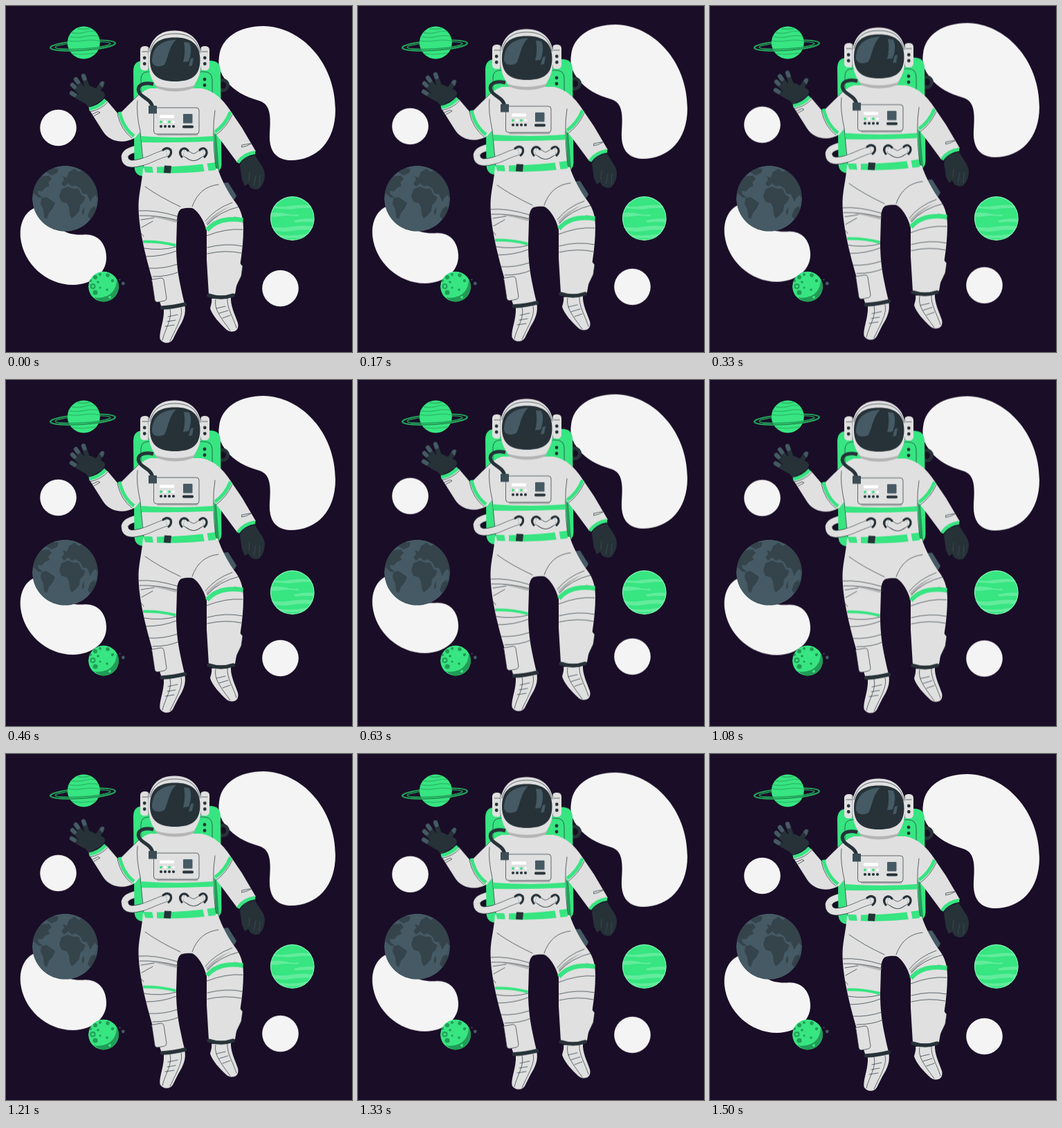
An HTML page that plays this animation: 500x500 px, repeating every 1540 ms.

```html
<!DOCTYPE html>
<html lang="en">
<head>
<meta charset="utf-8">
<title>Floating astronaut</title>
<style>
  html, body { margin: 0; height: 100%; overflow: hidden; background: #1a0d27; }
  svg { display: block; width: 100%; height: 100%; }

  /* 24 poses per second: up for 18, down for 18, then one rest */
  .float { animation: float 1540ms -5ms infinite steps(18); }
  @keyframes float {
    0%, 97.403%, 100% { transform: translateY(0); }
    48.701% { transform: translateY(-10px); }
  }

  .pale { fill: #f4f4f4; }
  .suit { fill: #e0e0e0; }
  .shade { fill: #b4b4b4; }
  .green { fill: #37e581; }
  .deep { fill: #229c57; }
  .mint { fill: #62ec9c; }
  .dark { fill: #263238; }
  .slate { fill: #455a64; }
  .land { fill: #35434b; }
  .line { fill: none; stroke: #263238; stroke-width: .7; stroke-linecap: round; stroke-linejoin: round; }
  .edge { stroke: #263238; stroke-width: .7; stroke-linejoin: round; }
  .band { fill: none; stroke: #37e581; stroke-width: 5; }
  .cuff { fill: none; stroke: #263238; stroke-width: 5.5; stroke-linecap: round; }
  .tube { fill: none; stroke: #e0e0e0; stroke-width: 9.5; }
  .rim { fill: none; stroke: #263238; stroke-width: 10.8; }
  .port { fill: none; stroke: #263238; stroke-width: 3.2; stroke-linecap: round; }
  .ring { fill: none; stroke: #229c57; }
  .finger { fill: none; stroke: #263238; stroke-width: 7; stroke-linecap: round; }
  .tip { fill: none; stroke: #455a64; stroke-width: 6; stroke-linecap: round; }
</style>
</head>
<body>
<svg viewBox="0 0 500 500" xmlns="http://www.w3.org/2000/svg">
  <defs>
    <clipPath id="saturn"><circle cx="112.3" cy="53" r="23.5"/></clipPath>
    <clipPath id="earth"><circle cx="85.5" cy="278.3" r="47.5"/></clipPath>
    <clipPath id="mint"><circle cx="413.8" cy="307" r="32"/></clipPath>
    <clipPath id="moon"><circle cx="141" cy="405.5" r="22"/></clipPath>
    <clipPath id="front"><path d="M55 57.5L165 52V80H55Z"/></clipPath>
    <g id="rings" class="ring" transform="rotate(-4 111 57)">
      <ellipse cx="111" cy="57" rx="47" ry="7" stroke-width="2.2"/>
      <ellipse cx="111" cy="57" rx="40" ry="4.6" stroke-width="1.3"/>
    </g>
    <path id="inlet" d="M198 205C181 207 171 211 171.500 219"/>
    <path id="outlet" d="M171.500 218C172 230 184 229 195 226C210 222 219 215 232 212.500"/>
    <path id="link" d="M257 212C263 213 264 218 271 218.500C278 218 279 213 285 212"/>
  </defs>

  <g class="float pale">
    <path d="M308 73C311 45 338 29 372 29C427 30 476 82 476 150C476 196 449 223 411 223C388 222 380 207 381 185C383 158 382 142 366 137C345 131 329 122 319 109C309 97 306 86 308 73Z"/>
    <path d="M46 290C28 295 19 313 21 335C25 372 58 403 97 403C126 402 146 385 145 362C144 340 130 329 112 330.500C95 331 82 328 74 316C65 300 58 288 46 290Z"/>
    <circle cx="75.500" cy="176" r="26.300"/>
    <circle cx="396.500" cy="408" r="26.300"/>
  </g>

  <!-- ringed planet -->
  <g>
    <use href="#rings"/>
    <circle class="green" cx="112.300" cy="53" r="23.500"/>
    <g clip-path="url(#saturn)" fill="none" stroke="#2cc16c" stroke-width="1.500">
      <path d="M92 38Q104 41 113 38T135 38M88 44Q102 47 114 44T138 45M88 50Q100 52 112 50T138 51M92 68Q108 72 134 67"/>
      <path d="M103 32Q110 35 122 32" stroke-width="2"/>
    </g>
    <g clip-path="url(#front)"><use href="#rings"/></g>
  </g>

  <!-- earth -->
  <g clip-path="url(#earth)">
    <circle class="slate" cx="85.500" cy="278.300" r="47.500"/>
    <g class="land">
      <path d="M38 268L42 256L52 246L62 245L66 250L61 255L63 260L56 263L52 268L46 267L47 272L53 277L47 277L39 270Z"/>
      <path d="M58 240L66 234L76 235L74 241L66 245Z"/>
      <path d="M51 278L58 276L66 281L71 285L67 293L62 299L59 308L55 305L54 294L50 286Z"/>
      <path d="M80 265L89 261L97 264L105 264L109 273L115 276L112 283L107 288L106 296L100 303L95 307L92 301L91 291L88 285L80 283L77 275Z"/>
      <path d="M80 257L84 251L82 246L88 248L91 240L99 235L105 240L112 236L126 248L135 262V280L129 273L125 277L122 283L117 272L111 271L107 263L100 259L95 261L90 256L84 261Z"/>
      <path d="M110 296L113 291L113 299L110 303ZM122 293L128 289L131 297L122 308L118 304Z"/>
    </g>
    <path d="M110 232C138 252 140 296 106 325L136 316V236Z" fill="#263238" opacity=".2"/>
  </g>

  <!-- banded planet -->
  <g clip-path="url(#mint)">
    <circle class="green" cx="413.800" cy="307" r="32"/>
    <g class="mint">
      <path d="M382 288Q394 292 410 289T446 289V292Q430 291 418 293T382 291Z"/>
      <path d="M380 300Q394 297 404 300T424 301L421 304Q407 302 396 304T380 303Z"/>
      <path d="M416 310Q430 306 447 308V312Q432 311 418 313Z"/>
      <path d="M380 318Q396 322 412 319T447 319V324Q426 322 412 325T380 322Z"/>
      <path d="M390 330Q412 334 436 329L430 334Q412 337 396 334Z"/>
    </g>
    <circle cx="413.800" cy="307" r="31.300" fill="none" stroke="#7af0ac" stroke-width="1.400"/>
  </g>

  <!-- cratered moon -->
  <g clip-path="url(#moon)">
    <circle class="green" cx="141" cy="405.500" r="22"/>
    <g class="deep">
      <path d="M160 394Q160 412 146 419Q136 423 127 421L140 430L166 426V394Z"/>
      <circle cx="129" cy="392" r="3"/><circle cx="125.500" cy="405" r="4"/>
      <circle cx="136" cy="388" r="2"/><circle cx="147" cy="389" r="2.800"/>
      <circle cx="154" cy="397" r="2.200"/><circle cx="133" cy="399" r="1.800"/>
      <circle cx="129" cy="414" r="3.500"/><circle cx="146" cy="410" r="1.800"/>
      <circle cx="122" cy="397" r="2"/><circle cx="136" cy="407" r="1.500"/>
    </g>
    <g class="green"><circle cx="125.500" cy="405" r="2"/><circle cx="150" cy="421" r="2"/></g>
  </g>
  <g class="slate"><circle cx="169.300" cy="401" r="2.400"/><circle cx="164.500" cy="395.500" r="1"/></g>

  <g class="float">
    <!-- backpack -->
    <use href="#inlet" class="rim"/>
    <use href="#inlet" class="tube"/>
    <circle cx="313" cy="114.500" r="7.500" fill="none" stroke="#263238" stroke-width="5"/>
    <path class="green" d="M184 94Q184 79 199 79H295Q310 79 310 94L311.500 229Q311 240 300 242L198 246Q186 245 185.500 232Z"/>
    <path class="line" d="M195 150V106Q195 95 206 95H286Q298 95 298 107V126"/>
    <g class="dark"><circle cx="287" cy="106" r="2.400"/><circle cx="287" cy="114.500" r="2.400"/></g>
    <path class="deep" d="M301 184L304 186L308 238L303 238Z"/>
    <path class="slate" d="M309 256L321 255L333 274Q331 281 322 284L312 270Z"/>

    <!-- calf box and feet -->
    <path class="suit edge" d="M332 364L342 376L340 390L331 409Z"/>
    <path class="suit" d="M228 438L258 431C261 444 256 455 249 466L241 482C237 489 226 488 222.500 481C221 470 229 455 228 438Z"/>
    <path class="line" d="M237 438C241 452 230 466 226 483M253 436C256 448 248 461 237 484M234 449L248 446M233 456L245 454M230 463L243 461"/>
    <path class="suit" d="M297 423L325 420C324 433 331 446 335 458C338 469 328 474 319 468C309 459 298 447 295 437C296 432 298 428 297 423Z"/>
    <path class="line" d="M303 424C300 438 311 451 324 469M320 423C319 436 328 449 333 465M304 437L317 434M308 444L321 440M313 451L324 447"/>

    <!-- legs -->
    <path class="suit" d="M198 234C197 252 192 270 191.500 287C191 322 203 366 212 397L225 436Q242 439 258 430C251 400 246 379 246 346L247 312C247 303 249 295 254 293Q262 291 269 292C276 295 286 308 290 325L290 367L293 417Q312 423 331 416C336 386 343 356 343 321C343 303 338 292 331 283C322 271 312 253 306 235Z"/>
    <path class="shade" d="M208 304Q230 305 248 310L246 313Q228 308 208 304ZM289 313Q304 296 326 289Q309 296 291 317Z"/>
    <path class="line" d="M192 296Q215 294 248 304L249 310Q220 302 193 303M201 261Q222 276 252 290M307 258Q279 261 269 290M288 311Q302 293 327 284M291 316Q308 297 337 290M195 309L214 306M196 320L212 311M193 326L199 333M199 350Q224 354 246 348M202 362Q226 362 246 354M207 379Q228 380 248 373M212 391Q235 391 250 384M290 332Q318 321 342 323M291 349Q318 342 342 347M291 358Q317 352 340 357M330 305L340 307"/>
    <path class="band" style="stroke-width:4" d="M198 340.500Q224 340 245.500 346"/>
    <path class="band" style="stroke-width:6.500" d="M290.500 324Q307 304 342.500 309.500"/>
    <path class="suit edge" d="M211 398Q209 395 213 395L224 393Q227 393 228 396L232 422Q232 425 229 426L219 428Q216 428 215 425Z"/>
    <path class="cuff" d="M225.500 436Q243 435 258.500 431"/>
    <path class="cuff" d="M293 418Q311 424 328 418"/>

    <!-- waving arm -->
    <path class="finger" d="M121 128L112 101M118 130L101 106M115 132L96 114M114 137L95 126M125 133L139 112"/>
    <path class="dark" d="M106 121Q113 112 123 116L134 121Q144 124 143 130L139 136L120 147Q113 139 106 130Z"/>
    <path class="tip" d="M113.500 105L112 101M104 110L101 106M99 117L96 114M99 128.500L95 126"/>
    <path class="slate" d="M135 113Q138 107 142 110L140 118Z"/>
    <path class="suit" d="M207 120C195 124 187 132 181 139L163 157L146 137L121 151L140 181C150 197 171 200 187 190L200 174L222 128Z"/>
    <path class="band" d="M120 149Q135 146 144 135.500"/>
    <path class="line" d="M121 153Q137 150 147 139M123 157L133 152.500L136 154L127 159M163 157L169 163M181 139L192 128"/>
    <path class="band" d="M164 153Q169 176 185 188"/>
    <path class="line" d="M161 156Q166 179 182 191"/>

    <!-- resting arm -->
    <path class="dark" d="M338 231Q339 223 347 219L360 216L367 227Q374 236 374 244Q374 256 366 264Q359 267 353 262L350 257L345 260L341 251Z"/>
    <path d="M351 253L352 240M358 260L361 245M366 260L367 245" fill="none" stroke="#455a64" stroke-width=".6"/>
    <path class="suit" d="M280 119C299 121 313 134 324 151L341 176L361 210L334 226L314 199L300 181Z"/>
    <path class="band" d="M335 226.500Q343 214 360 211.500"/>
    <path class="line" d="M338 231Q346 218 361 215M341 204Q348 203 354 199L351 199L341 201Z"/>

    <!-- torso -->
    <path class="suit" d="M208 119L282 119Q298 122 305 132L301 160Q299 190 303 236Q250 244 199 237L195 190Q190 164 191 135Q195 123 208 119Z"/>
    <path class="line" d="M190 137Q188 155 194 181L199 233M302 151Q297 181 303 233"/>
    <path class="band" d="M324.500 153Q317 172 302 182"/>
    <path class="line" d="M327 157Q319 175 304 186"/>
    <path class="green" d="M195 188Q248 192 299 188V195.500Q248 198 196 197Z"/>
    <path class="shade" d="M217 183H278L277 187.500H219Z"/>
    <rect class="suit edge" x="213.500" y="147" width="65.500" height="38" rx="4"/>
    <rect x="222" y="157.500" width="21" height="4.500" rx="1" fill="#fff"/>
    <g class="green"><circle cx="224" cy="167.500" r="1.900"/><circle cx="236" cy="167.500" r="1.900"/></g>
    <g fill="#fff"><circle cx="230" cy="167.500" r="1.900"/><circle cx="242" cy="167.500" r="1.900"/></g>
    <g class="dark">
      <circle cx="224" cy="174" r="2.100"/><circle cx="230" cy="174" r="2.100"/><circle cx="236" cy="174" r="2.100"/><circle cx="242" cy="174" r="2.100"/>
      <rect x="255" y="172.500" width="16" height="4" rx="1.800"/>
    </g>
    <rect class="slate" x="256" y="156" width="13.500" height="13.500" rx="1"/>

    <!-- belt -->
    <path class="green" d="M199 232Q252 234 302 226L303 237Q252 244 201 240.500Z"/>
    <path class="suit" d="M211 230H218V242H213ZM284 226L290 225L293 240L287 240Z"/>
    <path class="dark" d="M229 230.500L239 231L238 241.500L228 241Z"/>

    <!-- hoses -->
    <use href="#outlet" class="rim"/>
    <use href="#outlet" class="tube"/>
    <use href="#link" class="rim"/>
    <use href="#link" class="tube"/>
    <path class="port" d="M227 208Q233 203 238 208Q240 214 235 218M254 218Q249 212 254 207Q259 204 263 209M280 208Q285 203 289 208Q292 213 287 218"/>

    <!-- helmet -->
    <path class="shade" d="M214 113Q243 121 274 113L270 119Q244 128 219 119Z"/>
    <rect class="suit" x="194" y="58" width="13.500" height="35" rx="5.500"/>
    <rect class="suit" x="280.500" y="58" width="13.500" height="35" rx="5.500"/>
    <g class="dark">
      <circle cx="200.200" cy="75" r="2.400"/><circle cx="200.200" cy="83.500" r="2.400"/>
      <circle cx="287.300" cy="75" r="2.400"/><circle cx="287.300" cy="83.500" r="2.400"/>
    </g>
    <path class="line" d="M197 66H205M283 66H291M206 60V92M281.500 60V92"/>
    <path class="suit" d="M205.500 78C205 51 219 35.500 243.500 35.500C269 35.500 283 52 282.500 79C282 96 277 108 271 115Q244 123 217 115C210 107 206 96 205.500 78Z"/>
    <path class="line" d="M208 66C212 49 223 40 244 40C266 40 277 50 280 67"/>
    <path class="dark" d="M208 78C208 55 220 45.500 244 45.500C269 45.500 280.500 56 280.500 79C280 101 268 109 244 109C220 109 208 100 208 78Z"/>
    <path class="slate" d="M211 81C211 61 222 50 246 48.500C235 59 235 73 229 85Q215 91 211 81ZM257 52L265 53Q270 64 264 80L256 81Q260 66 257 52ZM267 76L271 75L269 86L264 87Z"/>

    <!-- air line -->
    <path d="M213 113C199 109 188 115 192 124C196 133 210 134 212 147" fill="none" stroke="#263238" stroke-width="5"/>
    <rect x="206" y="144" width="12" height="11.500" fill="#3b4c55"/>
  </g>
</svg>
</body>
</html>
```
